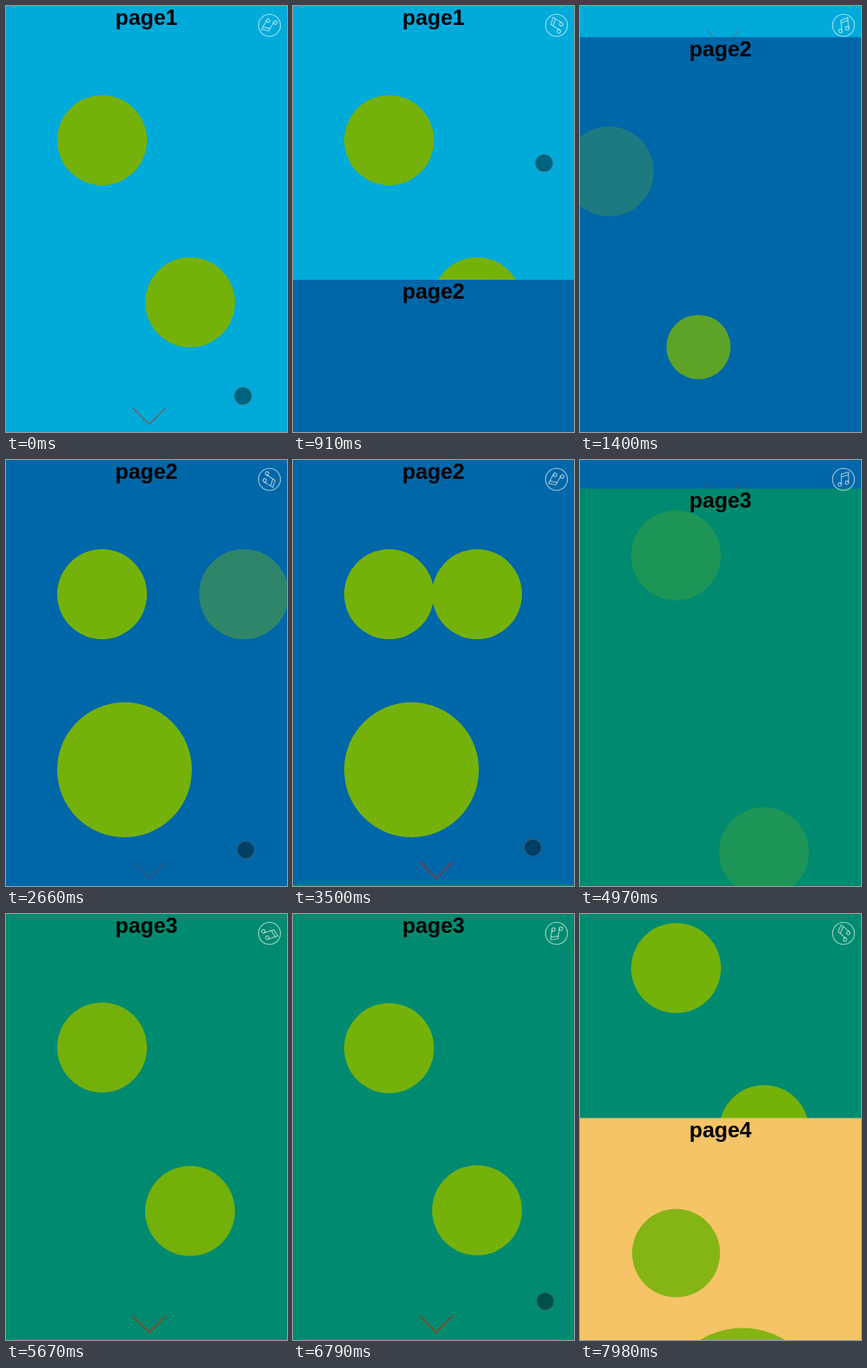
Animation, 313 px wide and 473 px high, one loop 8 s. Source, as an HTML page with a canvas:

```html
<!DOCTYPE html>
<html lang="en">
<head>
<meta charset="utf-8">
<title>Swipe pages</title>
<style>
html, body { margin: 0; width: 100%; height: 100%; overflow: hidden; }
canvas { display: block; width: 313px; height: 473px; }
</style>
</head>
<body>
<canvas id="stage" width="313" height="473"></canvas>
<script>
const W = 313, H = 473, LOOP = 8000, SLIDE = 800, ENTER = 1000;
const ctx = document.getElementById('stage').getContext('2d');
const clamp = v => Math.min(1, Math.max(0, v));
const smooth = v => v * v * (3 - 2 * v);

// cubic-bezier(.25, .1, .25, 1)
function ease(x) {
  x = clamp(x);
  const curve = (a, b, u) => 3 * a * u * (1 - u) ** 2 + 3 * b * u * u * (1 - u) + u ** 3;
  let low = 0, high = 1;
  for (let i = 0; i < 24; i++) {
    const mid = (low + high) / 2;
    if (curve(.25, .25, mid) < x) low = mid; else high = mid;
  }
  return curve(.1, 1, low);
}

// Entrances map eased progress to an offset, scale and opacity.
const still = () => ({});
const slideIn = (dx, dy) => p => ({ dx: dx * (1 - p), dy: dy * (1 - p), alpha: p });
const zoomIn = p => ({ scale: p ? .3 + .7 * p : 0, alpha: clamp(p * 3.2) });
const shrink = p => ({ scale: 1 - .16 * p, alpha: 1 - p });

const dot = (x, y, r, enter = still, delay = 300) => ({ x, y, r, enter, delay });

const pages = [
  { color: '#00abda', dots: [dot(107, 149, 50), dot(205, 329, 50)] },
  { color: '#0067a9', drag: 70, dragTime: 780, pull: 169, release: 920, dots: [
    dot(107, 149, 50, slideIn(-100, 0)),
    dot(132, 344, 75, zoomIn),
    dot(205, 149, 50, slideIn(100, 0), 1495)] },
  { color: '#008b70', drag: 3450, dragTime: 930, pull: 195, release: 4490, dots: [
    dot(107, 149, 50, slideIn(0, -100)),
    dot(205, 329, 50, slideIn(0, 100))] },
  { color: '#f5c466', drag: 6830, dragTime: 930, pull: 194, release: 7860, dots: [
    dot(107, 150, 50, shrink, 0),
    dot(181, 322, 91, shrink, 0)] }
];

const swipes = [
  { page: pages[1], shown: 0, x: 264, y: 433 },
  { page: pages[2], shown: 2590, x: 267, y: 433 },
  { page: pages[3], shown: 6740, x: 281, y: 430 }
];

const pulled = (page, t) => page.pull * smooth(clamp((t - page.drag) / page.dragTime));
const slid = (page, t) => ease((t - page.release) / SLIDE);

function disc(x, y, r) {
  ctx.beginPath();
  ctx.arc(x, y, r, 0, 2 * Math.PI);
}

function polyline(...points) {
  ctx.beginPath();
  points.forEach(([x, y]) => ctx.lineTo(x, y));
  ctx.stroke();
}

function drawPage(page, index, top, t) {
  ctx.save();
  ctx.translate(0, top);
  ctx.fillStyle = page.color;
  ctx.fillRect(0, 0, W, H + 1);

  ctx.fillStyle = '#74b20a';
  for (const d of page.dots) {
    const progress = page.release ? ease((t - page.release - d.delay) / ENTER) : 1;
    const { dx = 0, dy = 0, scale = 1, alpha = 1 } = d.enter(progress);
    ctx.globalAlpha = alpha;
    disc(d.x + dx, d.y + dy, d.r * scale);
    ctx.fill();
  }

  ctx.globalAlpha = .38 - .2 * Math.sin(2 * Math.PI * t / 1200);
  ctx.strokeStyle = '#c02808';
  ctx.lineWidth = 2;
  polyline([141, 446], [159.5, 464.5], [178, 446]);

  ctx.globalAlpha = 1;
  ctx.fillStyle = '#000';
  ctx.font = 'bold 24px "Liberation Sans", Arial, sans-serif';
  ctx.textAlign = 'center';
  ctx.fillText('page' + (index + 1), 156.5, 21);
  ctx.restore();
}

function drawMusicIcon(t) {
  ctx.save();
  ctx.translate(293.5, 21.5);
  ctx.strokeStyle = 'rgba(255,255,255,.58)';
  ctx.lineWidth = 1.1;
  disc(0, 0, 12.2);
  ctx.stroke();
  ctx.rotate(2 * Math.PI * ((t - 1400) / 3500 - .02));
  polyline([-2.4, 5.5], [-2.4, -5.8], [5.6, -8], [5.6, 3.5]);
  polyline([-2.4, -2.8], [5.6, -5]);
  for (const [x, y] of [[-4.2, 5.8], [3.8, 3.8]]) {
    disc(x, y, 1.9);
    ctx.stroke();
  }
  ctx.restore();
}

function drawPointer(t) {
  for (const { page, shown, x, y } of swipes) {
    if (t < shown || t >= page.release) continue;
    const pull = pulled(page, t);
    disc(x + pull * .093, y - pull * 1.53, 9.5);
    ctx.fillStyle = 'rgba(0,20,30,.48)';
    ctx.fill();
    ctx.strokeStyle = 'rgba(80,90,95,.45)';
    ctx.lineWidth = 1.5;
    ctx.stroke();
  }
}

function draw(t) {
  pages.forEach((page, i) => {
    const next = pages[i + 1];
    const entered = !page.release || t > page.drag;
    const left = next && t >= next.release + SLIDE;
    if (!entered || left) return;
    let top = page.release ? (H - pulled(page, t)) * (1 - slid(page, t)) : 0;
    if (next) top -= H * slid(next, t);
    drawPage(page, i, top, t);
  });
  drawMusicIcon(t);
  drawPointer(t);
}

const start = performance.now();
function tick() {
  draw((performance.now() - start) % LOOP);
  requestAnimationFrame(tick);
}
tick();
</script>
</body>
</html>
```
